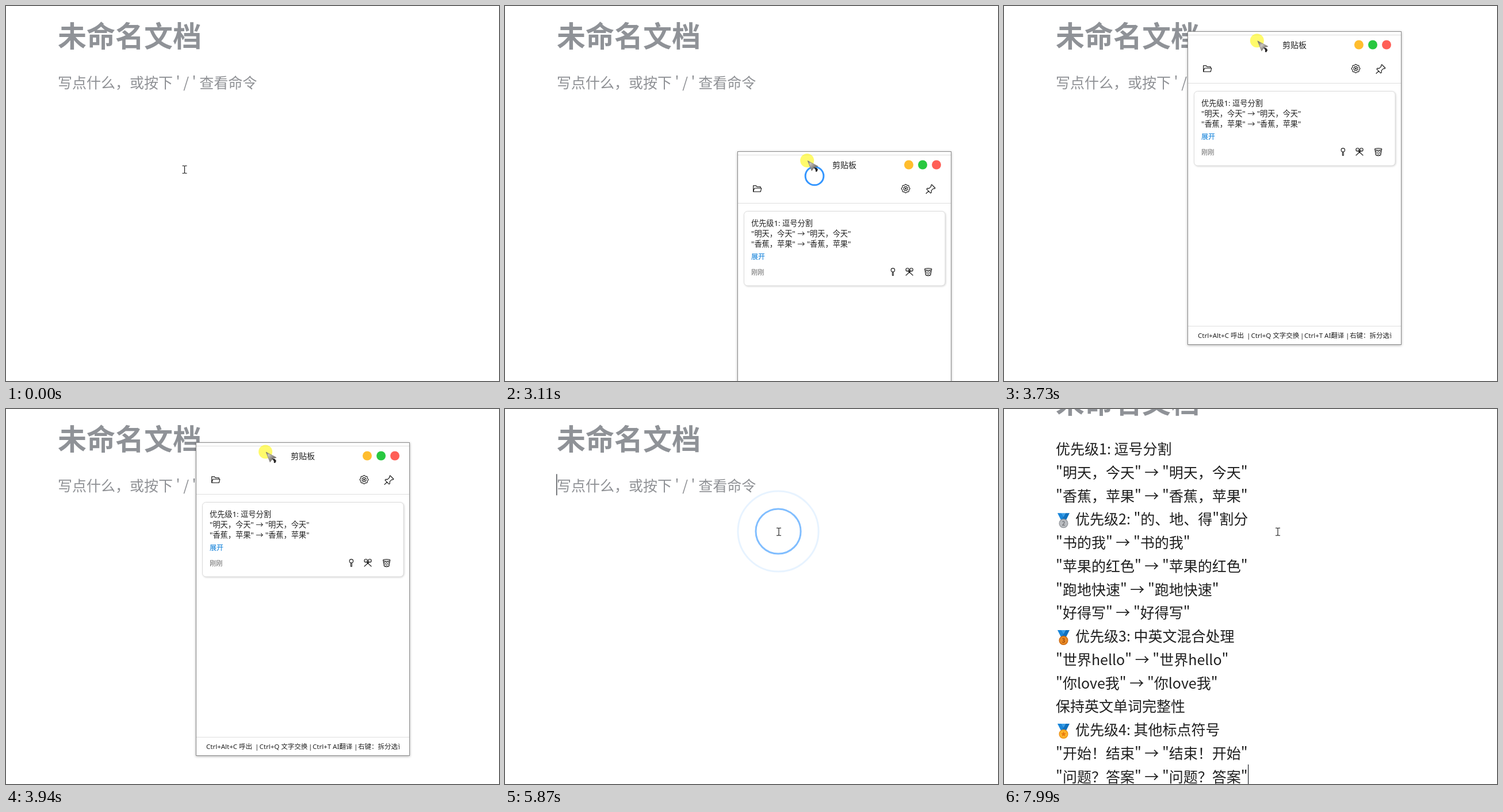
These frames come from a looping animation (857 by 653 pixels, 8.47 s). An HTML page:

```html
<!DOCTYPE html>
<html lang="zh-CN">
<head>
<meta charset="utf-8">
<title>剪贴板</title>
<style>
  html, body { margin: 0; width: 100%; height: 100%; overflow: hidden; background: #fff; }
  svg { display: block; }
  text { font-family: "Noto Sans CJK SC", "Noto Sans CJK", sans-serif; }
  .ui text { font-family: "Noto Sans", "Noto Sans CJK SC", "Noto Sans CJK", sans-serif; fill: #222; }
  .icon { fill: none; stroke: #1c1c1c; stroke-width: 1.15; stroke-linejoin: round; stroke-linecap: round; }
  .shadow { filter: drop-shadow(0 1px 2px rgba(0,0,0,.32)); }
  .card { filter: drop-shadow(1px 1px 1.5px rgba(0,0,0,.16)); }
</style>
</head>
<body>
<svg width="857" height="653" viewBox="0 0 857 653">
  <defs>
    <linearGradient id="metal" x1="0" y1="0" x2="1" y2="1">
      <stop offset="0" stop-color="#5c5852"/>
      <stop id="sheen" offset=".5" stop-color="#c9c5bf"/>
      <stop offset="1" stop-color="#3d3b3a"/>
    </linearGradient>
    <clipPath id="footerClip"><rect x="0" y="514" width="353" height="28"/></clipPath>
  </defs>

  <g id="page">
    <text x="90" y="71.3" font-size="50" font-weight="700" fill="#8f9297">未命名文档</text>
    <text id="hint" x="90" y="143" font-size="25" fill="#8f9195">写点什么，或按下 ' / ' 查看命令</text>
    <g id="lines" font-size="25" fill="#1f1f1f"></g>
    <rect id="caret" width="1.2" height="37" fill="#1f2329"/>
  </g>

  <g id="panel" class="ui">
    <rect class="shadow" x="-.5" y="-.5" width="371" height="545" fill="#fff" stroke="#8c8c8c"/>
    <path d="M0 5.5H370M0 89.5H370M0 512.5H370" stroke="#dedede"/>
    <text x="185" y="28.3" font-size="14" text-anchor="middle">剪贴板</text>
    <circle cx="296.9" cy="22.5" r="8" fill="#ffbd2e"/>
    <circle cx="321" cy="22.5" r="8" fill="#28c840"/>
    <circle cx="345" cy="22.5" r="8" fill="#ff5f57"/>
    <rect class="card" x="10.5" y="103.5" width="349.5" height="129.5" rx="6" fill="#fff" stroke="#dcdcdc"/>
    <g id="excerpt" font-size="13.2"></g>
    <text x="23" y="186.5" font-size="12" style="fill:#0078d7">展开</text>
    <text x="23" y="213.6" font-size="11.2" style="fill:#666">刚刚</text>
    <g id="footer" font-size="11.5" clip-path="url(#footerClip)"></g>
    <g class="icon">
      <path d="M26.6 69.5V58.8h4.8l1.6 2h6.2v2.4M26.6 69.5l2-6.3h12.2l-1.6 6.3z"/>
      <path id="gear"/>
      <circle cx="291.5" cy="64" r="3.4"/>
      <circle cx="291.5" cy="64" r="1" fill="#1c1c1c"/>
      <path d="M336.8 57l6 6-1.4 1.2-1.7-.4-3.6 3.6.2 3.1-1.4 1.3-7-7 1.3-1.4 3.1.2 3.6-3.6-.4-1.7zM331.2 68.3L327 72.5"/>
      <circle cx="269.3" cy="205.8" r="3.2"/>
      <path d="M268.4 209.2v6h1.8v-6"/>
      <circle cx="294.6" cy="205.2" r="2.7"/>
      <circle cx="301.4" cy="205.2" r="2.7"/>
      <path d="M294.6 205.2h.1M301.4 205.2h.1M296 207.6l8 7.4M300 207.6l-8 7.4M297 207.2l2 2M299 207.2l-2 2"/>
      <ellipse cx="330.6" cy="204.5" rx="6.2" ry="1.7"/>
      <path d="M325 206.2l1.6 8.6q4 1.6 8 0l1.6-8.6"/>
      <path d="M326 208l7 7M329 207l6 6M333 207l2.6 2.4M335.2 208l-7 7M332.2 207l-6 6M328.2 207l-2.6 2.4" stroke-width=".8"/>
    </g>
  </g>

  <g id="ripples" fill="none" stroke="#007bff" stroke-width="3"></g>
  <circle id="press" r="12" fill="#fff700" opacity=".58"/>
  <g id="arrow">
    <path d="M1 1L19 10.6 12.6 12.2 8 18.5Z" fill="url(#metal)" stroke="#77736e" stroke-width=".7"/>
    <path id="tail" d="M11.2 12.2l5 1.6 2 3.6-2.4 3.4-2.2-.6.4-3.2z" fill="#262424"/>
  </g>
  <path id="beam" d="M-4-6.5h3l1 1 1-1h3M0-5.5v11M-4 6.5h3l1-1 1 1h3" fill="none" stroke="#111" stroke-width="1.1"/>
</svg>

<script>
const LOOP = 8470, PANEL_OPEN = 1640, PANEL_CLOSE = 5735, PASTE = 5990, SCROLL = 64;
const DRAG_START = 3010, DRAG_END = 4000, GRIP = [120, 15];
const LINE_HEIGHT = 40.75;
const $ = id => document.getElementById(id);

function add(parent, tag, attrs, content = '') {
  const node = document.createElementNS('http://www.w3.org/2000/svg', tag);
  for (const key in attrs) node.setAttribute(key, attrs[key]);
  node.textContent = content;
  parent.append(node);
  return node;
}
const show = (node, on) => node.setAttribute('visibility', on ? 'visible' : 'hidden');
const move = (node, x, y, extra = '') => node.setAttribute('transform', `translate(${x} ${y})${extra}`);
const within = (t, spans) => spans.some(([a, b]) => t >= a && t < b);
const clamp = v => Math.min(1, Math.max(0, v));
const easeInOut = v => v * v * (3 - 2 * v);

// Pasted document
const same = s => `"${s}" → "${s}"`;
const MEDALS = {
  2: { fill: '#b9bcc0', rim: '#93979c', mark: '#77797d' },
  3: { fill: '#e88a25', rim: '#c8650f', mark: '#a34a08' },
  4: { fill: '#fdb52b', rim: '#eb8f14', mark: '#e87a10' }
};
const rank = (n, label) => ({ n, label: `优先级${n}: ${label}` });
const content = [
  '优先级1: 逗号分割', same('明天，今天'), same('香蕉，苹果'),
  rank(2, '"的、地、得"割分'), same('书的我'), same('苹果的红色'), same('跑地快速'), same('好得写'),
  rank(3, '中英文混合处理'), same('世界hello'), same('你love我'), '保持英文单词完整性',
  rank(4, '其他标点符号'), '"开始！结束" → "结束！开始"', same('问题？答案')
];

function polar(count, radius) {
  return 'M' + Array.from({ length: count }, (_, i) => {
    const a = i / count * 2 * Math.PI - Math.PI / 2, r = radius(i, a);
    return `${(r * Math.cos(a)).toFixed(2)} ${(r * Math.sin(a)).toFixed(2)}`;
  }).join('L') + 'Z';
}

function drawMedal(n, y) {
  const { fill, rim, mark } = MEDALS[n], g = add($('lines'), 'g', {});
  move(g, 103.5, y);
  add(g, 'path', { d: 'M-10.5-20h7L2-11-1-6-3.5-6z', fill: '#1a86d9' });
  add(g, 'path', { d: 'M10.5-20h-7L-3-9-1-6 3.5-6z', fill: '#1070bd' });
  add(g, 'path', { d: 'M-3.5-20h7L0-13z', fill: '#3aa0ea' });
  add(g, 'circle', { cy: -2, r: 7.4, fill, stroke: rim, 'stroke-width': 1.3 });
  if (n === 4) move(add(g, 'path', { d: polar(10, i => i % 2 ? 2 : 5), fill: mark }), 0, -1.8);
  else add(g, 'text', { y: 1.6, 'font-size': 10, 'font-weight': 700, 'text-anchor': 'middle', fill: mark }, n);
}

content.forEach((line, i) => {
  const y = 143 + i * LINE_HEIGHT;
  if (line.n) drawMedal(line.n, y);
  add($('lines'), 'text', { x: line.n ? 124 : 90, y }, line.label || line);
});

// Clipboard panel
content.slice(0, 3).forEach((line, i) => add($('excerpt'), 'text', { x: 23, y: 129.3 + 18 * i }, line));
[[17, 'Ctrl+Alt+C 呼出'], [102, '|'], [109.5, 'Ctrl+Q 文字交换'], [195, '|'],
 [202, 'Ctrl+T AI翻译'], [274, '|'], [281, '右键：拆分选译']]
  .forEach(([x, s]) => add($('footer'), 'text', { x, y: 533 }, s));
$('gear').setAttribute('d', polar(64, (i, a) => 6.8 + 0.6 * Math.cos(8 * a)));
move($('gear'), 291.5, 64);

// Pointer: time, x, y
const path = [
  [2600, 309.5, 284], [2960, 538, 296], [3030, 538, 296], [3450, 410, 22],
  [3880, 451, 74], [4000, 451, 74], [4360, 475, 213]
];
function pointerAt(t) {
  const i = path.findIndex(p => t < p[0]);
  if (i === 0) return path[0].slice(1);
  if (i < 0) return path[path.length - 1].slice(1);
  const [t0, x0, y0] = path[i - 1], [t1, x1, y1] = path[i];
  const k = easeInOut((t - t0) / (t1 - t0));
  return [x0 + (x1 - x0) * k, y0 + (y1 - y0) * k];
}
function panelAt(t) {
  if (t < DRAG_START) return [418, 281];
  const [x, y] = pointerAt(Math.min(t, DRAG_END));
  return [x - GRIP[0], y - GRIP[1]];
}

const clicks = [DRAG_START, 5420, 5620];
const presses = [[DRAG_START, DRAG_END], [5440, 5520], [5620, 5700]];
const caretSpans = [[320, 850], [1310, 1640], [PANEL_CLOSE, 6400], [6930, 7530], [7990, LOOP]];
const rings = clicks.map(c => {
  const [cx, cy] = pointerAt(c);
  return add($('ripples'), 'circle', { cx, cy });
});

function stepped(t) {
  const snap = (start, size) => start + Math.floor((t - start) / size + 0.15) * size;
  if (t < 2630 || t >= 6140) return t;
  return t < 5470 ? Math.min(snap(2630, 68.9), 5325) : snap(5470, 67);
}

function draw(now) {
  const t = stepped(now % LOOP);
  const pasted = t >= PASTE;
  const scroll = pasted ? SCROLL * (1 - (1 - clamp((t - 5970) / 170)) ** 4) : 0;
  move($('page'), 0, -scroll);
  show($('hint'), !pasted);
  show($('lines'), pasted);
  show($('caret'), within(t, caretSpans));
  $('caret').setAttribute('x', pasted ? 424 : 89.3);
  $('caret').setAttribute('y', pasted ? 683 : 113.3);

  const open = t >= PANEL_OPEN && t < PANEL_CLOSE;
  const [px, py] = panelAt(t), [x, y] = pointerAt(t);
  show($('panel'), open);
  move($('panel'), Math.round(px), Math.round(py));

  const overPanel = open && x > px && x < px + 370 && y > py;
  show($('arrow'), overPanel);
  show($('beam'), !overPanel);
  move($('arrow'), x, y);
  move($('beam'), x + 1, y + 0.8);
  const phase = t / 820 * 2 * Math.PI;
  $('sheen').setAttribute('offset', 0.5 + 0.25 * Math.sin(phase));
  $('tail').setAttribute('transform', `rotate(${10 * Math.sin(phase)} 12 13)`);

  show($('press'), within(t, presses));
  move($('press'), x, y + 0.5);
  rings.forEach((ring, i) => {
    const age = t - clicks[i];
    show(ring, age > 0 && age < 500);
    ring.setAttribute('r', Math.max(0, age) * 0.155);
    ring.setAttribute('opacity', clamp(1 - age / 500));
  });
}

function tick() {
  draw(performance.now());
  requestAnimationFrame(tick);
}
tick();
</script>
</body>
</html>
```
